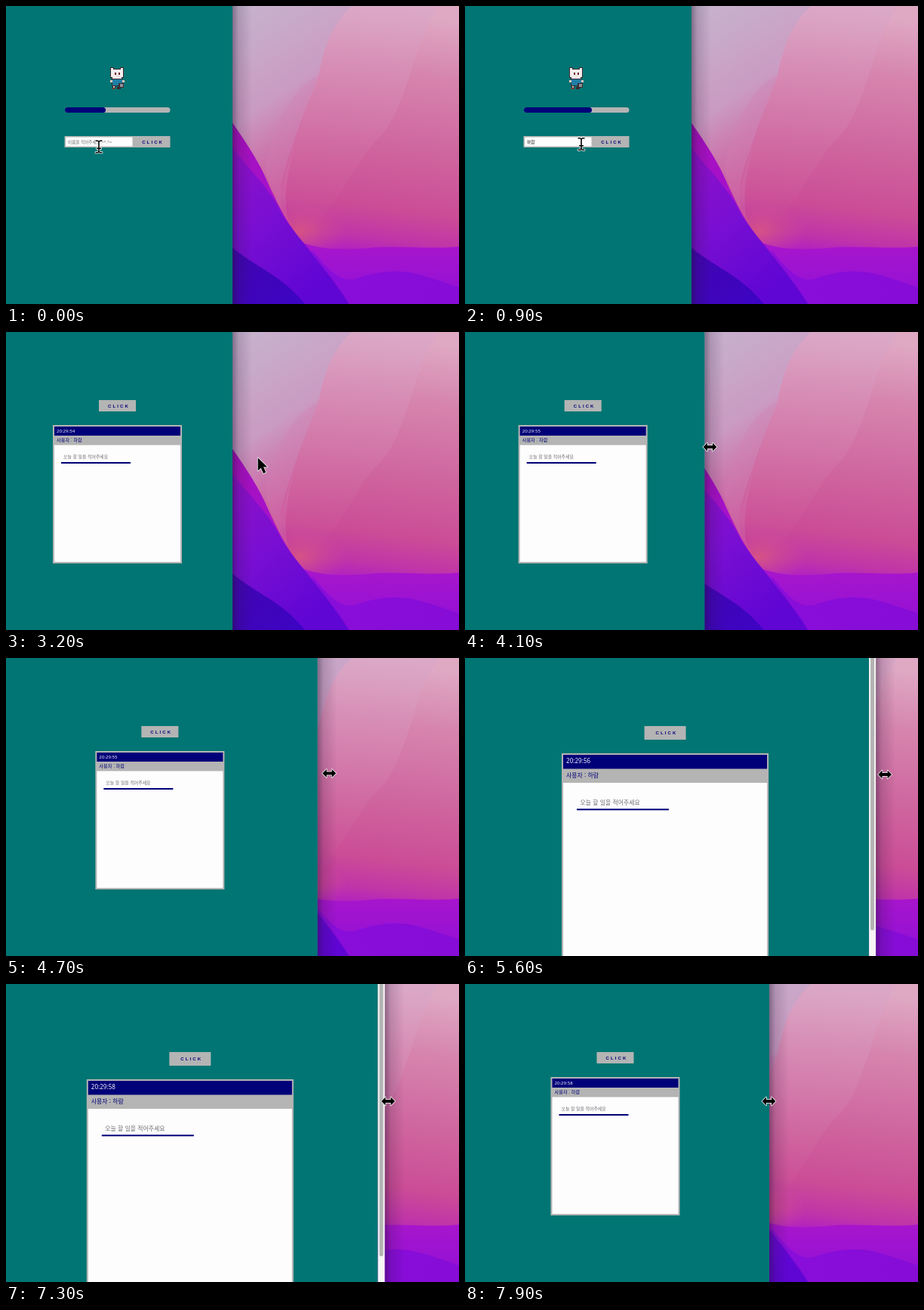
Animation, 600 px wide and 394 px high, one loop 8000 ms. Source, as an HTML page:

```html
<!DOCTYPE html>
<html lang="ko">
<head>
<meta charset="utf-8">
<title>To-do</title>
<style>
html, body { margin: 0; width: 100%; height: 100%; overflow: hidden; background: #007573; }
svg { display: block; width: 600px; height: 394px; }
text { font-family: "Noto Sans CJK KR", "Noto Sans CJK", "Noto Sans", sans-serif; fill: #6d6d72; white-space: pre; }
.clock { font-family: "Noto Sans", "Open Sans", sans-serif; fill: #f2f2fa; }
.user { fill: #000078; font-weight: 500; }
.click { font: bold 6px "Liberation Sans", Arial, sans-serif; letter-spacing: 2.1px; fill: #000078; }
.cursor { fill: #000; stroke: #fff; stroke-width: 1.5; paint-order: stroke; stroke-linejoin: round; }
</style>
</head>
<body>
<svg viewBox="0 0 600 394" xmlns="http://www.w3.org/2000/svg">
  <defs>
    <linearGradient id="sky" x1=".55" y1="0" x2=".45" y2="1">
      <stop offset="0" stop-color="#dfa9c4"/><stop offset=".2" stop-color="#d685ae"/>
      <stop offset=".45" stop-color="#cf669f"/><stop offset=".66" stop-color="#cb4c96"/>
      <stop offset=".76" stop-color="#c035a8"/><stop offset=".83" stop-color="#ad1dc6"/>
      <stop offset="1" stop-color="#980fd6"/>
    </linearGradient>
    <linearGradient id="haze" x1=".1" y1="0" x2=".5" y2="1">
      <stop offset="0" stop-color="#c6b3cc"/><stop offset=".45" stop-color="#c99fc6" stop-opacity=".9"/>
      <stop offset="1" stop-color="#cc5f9f" stop-opacity="0"/>
    </linearGradient>
    <linearGradient id="veil" x1="0" y1="0" x2="0" y2="1">
      <stop offset="0" stop-color="#d9a8c9"/><stop offset="1" stop-color="#d3689f" stop-opacity="0"/>
    </linearGradient>
    <linearGradient id="ridge" x1="0" y1="0" x2=".9" y2="1">
      <stop offset="0" stop-color="#a60fb8"/><stop offset=".5" stop-color="#a512cf"/><stop offset="1" stop-color="#7d0bd8"/>
    </linearGradient>
    <linearGradient id="slope" x1="0" y1="0" x2=".6" y2="1">
      <stop offset="0" stop-color="#9410c4"/><stop offset=".5" stop-color="#7a0fd2"/><stop offset="1" stop-color="#5f05d4"/>
    </linearGradient>
    <linearGradient id="deep" x1="0" y1="0" x2="1" y2="1">
      <stop offset="0" stop-color="#4205ae"/><stop offset="1" stop-color="#3d04c4"/>
    </linearGradient>
    <linearGradient id="dune" x1="0" y1="0" x2="0" y2="1">
      <stop offset="0" stop-color="#a916cb"/><stop offset="1" stop-color="#9010d8"/>
    </linearGradient>
    <linearGradient id="dune2" x1="0" y1="0" x2="1" y2="0">
      <stop offset="0" stop-color="#8a0edb"/><stop offset="1" stop-color="#860cd6"/>
    </linearGradient>
    <radialGradient id="glow"><stop offset="0" stop-color="#dc5a7c" stop-opacity=".8"/><stop offset="1" stop-color="#d05090" stop-opacity="0"/></radialGradient>
    <linearGradient id="shade"><stop offset="0" stop-color="#201030" stop-opacity=".42"/><stop offset=".3" stop-color="#201030" stop-opacity=".16"/><stop offset="1" stop-color="#201030" stop-opacity="0"/></linearGradient>
  </defs>

  <g id="wall">
    <rect x="290" width="310" height="394" fill="url(#sky)"/>
    <path d="M458 0H573C548 38 544 66 532 100C521 132 509 163 489 179C470 198 440 262 400 300L362 250C380 190 398 130 413 92C420 50 434 22 458 0Z" fill="url(#veil)" opacity=".65"/>
    <path d="M290 0H458C434 22 422 50 414 92C399 132 380 176 366 228C358 262 372 288 380 300L290 200Z" fill="url(#haze)"/>
    <path d="M414 92C376 110 354 160 343 215C352 244 362 268 380 300C360 262 372 200 414 92Z" fill="#cf7fb2" opacity=".3"/>
    <ellipse cx="390" cy="298" rx="62" ry="42" fill="url(#glow)"/>
    <path d="M385 310C420 325 455 322 490 319C530 317 565 322 600 318V394H400Z" fill="url(#dune)"/>
    <path d="M405 322C425 345 440 366 462 361C488 352 508 349 533 352C560 357 580 366 600 372V394H430Z" fill="url(#dune2)"/>
    <path d="M290 140C312 172 330 197 343 225C357 257 371 285 388 306C412 333 437 362 455 394H290Z" fill="url(#ridge)"/>
    <path d="M290 172C318 216 345 232 366 276C386 307 424 346 454 394H290Z" fill="url(#slope)"/>
    <path d="M290 311C325 344 362 352 396 394H290Z" fill="url(#deep)"/>
  </g>
  <rect id="shadow" y="0" width="26" height="394" fill="url(#shade)"/>

  <rect id="page" width="300" height="394" fill="#007573"/>
  <g id="bar">
    <rect width="9" height="394" fill="#f6f6f6"/>
    <rect x="2" y="-6" width="5" height="366" rx="2.5" fill="#b3b3b3"/>
  </g>

  <g id="login">
    <g id="pet" shape-rendering="crispEdges"></g>
    <rect x="78" y="134" width="139.5" height="7" rx="3.5" fill="#b4b4b4"/>
    <rect id="fill" x="78" y="134" height="7" rx="3.5" fill="#000078"/>
    <rect x="77.5" y="172" width="140" height="15" fill="#b4b4b4"/>
    <rect x="79" y="173.5" width="88.5" height="12" fill="#fdfdfd"/>
    <text id="name" x="82" y="181.6" font-size="5.6"></text>
    <text class="click" x="180.2" y="181.7">CLICK</text>
  </g>
  <g id="small"></g>
  <g id="big"></g>

  <path id="beam" class="cursor" d="M-4.500-8.500H-1.500L0-7.500L1.500-8.500H4.500V-7H1.500L.8-6V1.500H3V3H.8V6L1.500 7H4.500V8.500H1.500L0 7.500L-1.500 8.500H-4.500V7H-1.500L-.8 6V3H-3V1.500H-.8V-6L-1.500-7H-4.500Z"/>
  <path id="arrow" class="cursor" d="M.7 1.200V18.500L4.700 14.700L8 22L11.300 20.600L8.100 13.500H13.200Z"/>
  <path id="sizer" class="cursor" d="M-9 0L-3.500-5.500V-2H3.500V-5.500L9 0L3.500 5.500V2H-3.500V5.500Z"/>
</svg>
<script>
const LOOP = 8000, BREAK = 464;
const USER = "하람";
const $ = id => document.getElementById(id);
const rect = (x, y, w, h, fill) => `<rect x="${x}" y="${y}" width="${w}" height="${h}" fill="${fill}"/>`;

// Both layouts are drawn around x = 0, the middle of the page.
function layout(o) {
  const { w, top, h, title, sub, btn } = o;
  const left = -w / 2, inner = w - 4;
  return rect(-btn[0] / 2, 90, btn[0], btn[1], "#b4b4b4")
    + `<text class="click" x="-12.500" y="${o.clickY}">CLICK</text>`
    + rect(left, top, w, h, "#b4b4b4")
    + rect(left + 2, top + 2, inner, title, "#000078")
    + rect(left + 2, top + 2 + title + sub, inner, h - 4 - title - sub, "#fdfdfe")
    + `<text class="clock" x="${o.textX}" y="${o.clockY}" font-size="${o.clock}"></text>`
    + `<text class="user" x="${o.textX}" y="${o.userY}" font-size="${o.user}">사용자 : ${USER}</text>`
    + `<text x="${o.hintX}" y="${o.hintY}" font-size="${o.hint}">오늘 할 일을 적어주세요</text>`
    + rect(...o.line, "#000078");
}
$("small").innerHTML = layout({
  w: 171, top: 123, h: 183, title: 12, sub: 12.5, btn: [49, 15], clickY: 99.6,
  textX: -80.5, clock: 6.1, clockY: 133.2, user: 6.2, userY: 145.2,
  hintX: -71.5, hint: 5.9, hintY: 167.4, line: [-74.5, 172, 92, 2]
});
$("big").innerHTML = layout({
  w: 274, top: 126, h: 290, title: 18.5, sub: 18.5, btn: [55, 18], clickY: 101.2,
  textX: -131, clock: 8.1, clockY: 139, user: 7.9, userY: 157.6,
  hintX: -112.5, hint: 7.9, hintY: 193.8, line: [-117, 199.3, 122, 2]
});

function pet(step) {
  const dark = "#3b2a30", white = "#f3eeee", skin = "#e8c9c0", blue = "#1f7fa6";
  const a = step ? 1 : 0;
  return [
    [138, 81, 5, 4, dark], [151, 81, 5, 4, dark], [138, 83, 18, 12, dark], [140, 84, 14, 13, dark],
    [139, 82, 3, 3, white], [152, 82, 3, 3, white], [139, 84, 16, 10, white], [141, 94, 12, 2, white],
    [144, 88, 2, 3, "#6a2432"], [149, 88, 2, 3, "#6a2432"], [146, 92, 3, 1, skin],
    [140, 97, 15, 9, dark], [141, 97, 13, 8, blue],
    [138, 98 + a, 3, 3, skin], [154, 98 - a, 3, 3, skin],
    [149, 102, 7, 6, dark], [151, 103, 4, 4, "#8f9298"],
    [141 + a, 106, 4, 4, dark], [142 + a, 106, 2, 2, skin],
    [147 - a, 107, 5, 3, dark], [140 + 2 * a, 109, 5, 1, "#9a4a3a"]
  ].map(r => rect(...r)).join("");
}
const poses = [pet(0), pet(1)];

// Rows: time, value, ...
const splits = [[0, 300], [3900, 300], [4200, 326], [4500, 372], [4700, 412.5], [5000, 464], [5400, 520],
  [5600, 544], [6200, 607], [6600, 617], [6950, 617], [7200, 540], [7400, 464], [7600, 420], [7800, 400], [7900, 403]];
const mouse = [[0, 123, 186], [700, 125, 186], [1150, 190, 178], [1300, 192, 178], [1700, 284, 181],
  [2400, 312, 172], [3200, 333, 165], [3700, 304, 153], [3900, 303, 152], [4200, 335, 152], [4700, 428, 152.5],
  [5600, 556, 154], [6200, 619, 155], [6950, 624, 155], [7200, 545, 155], [7400, 468, 155],
  [7600, 422, 155], [7800, 400, 155], [7900, 402.5, 155]];
const typing = [[0, "이름을 적어주세요 =^.^="], [350, "ㅎ"], [480, "하"], [610, "할"], [740, "하라"], [870, USER]];

function at(rows, t, col = 1) {
  let i = rows.length - 1;
  while (rows[i][0] > t) i--;
  const a = rows[i], b = rows[i + 1];
  return b ? a[col] + (b[col] - a[col]) * (t - a[0]) / (b[0] - a[0]) : a[col];
}
const show = (id, on) => { $(id).style.display = on ? "" : "none"; };
const move = (id, x, y = 0) => $(id).setAttribute("transform", `translate(${x.toFixed(2)} ${y.toFixed(2)})`);
const clocks = document.querySelectorAll(".clock");
let pose = -1;

function draw(t) {
  const split = at(splits, t), big = split >= BREAK, login = t < 1300;
  const edge = big ? split - 9 : split, mid = (edge - 5) / 2;
  $("page").setAttribute("width", edge);
  $("shadow").setAttribute("x", split);
  show("bar", big);
  move("bar", edge);

  show("login", login);
  show("small", !login && !big);
  show("big", !login && big);
  move("small", mid);
  move("big", mid);

  $("fill").setAttribute("width", Math.min(139.5, 54 + t * .04));
  const text = typing.filter(r => r[0] <= t).pop()[1];
  $("name").textContent = text;
  $("name").style.fill = t < 350 ? "" : "#111";
  const next = Math.floor(t / 200) % 2;
  if (next !== pose) $("pet").innerHTML = poses[pose = next];

  const sec = 52 + Math.floor((t - 1050) / 1000);
  clocks.forEach(c => { c.textContent = "20:29:" + sec; });

  const x = at(mouse, t), y = at(mouse, t, 2);
  const kind = t >= 3700 ? "sizer" : x < 168 ? "beam" : "arrow";
  for (const id of ["beam", "arrow", "sizer"]) {
    show(id, id === kind);
    move(id, x, y);
  }
}
function tick() {
  draw(performance.now() % LOOP);
  requestAnimationFrame(tick);
}
tick();
</script>
</body>
</html>
```
